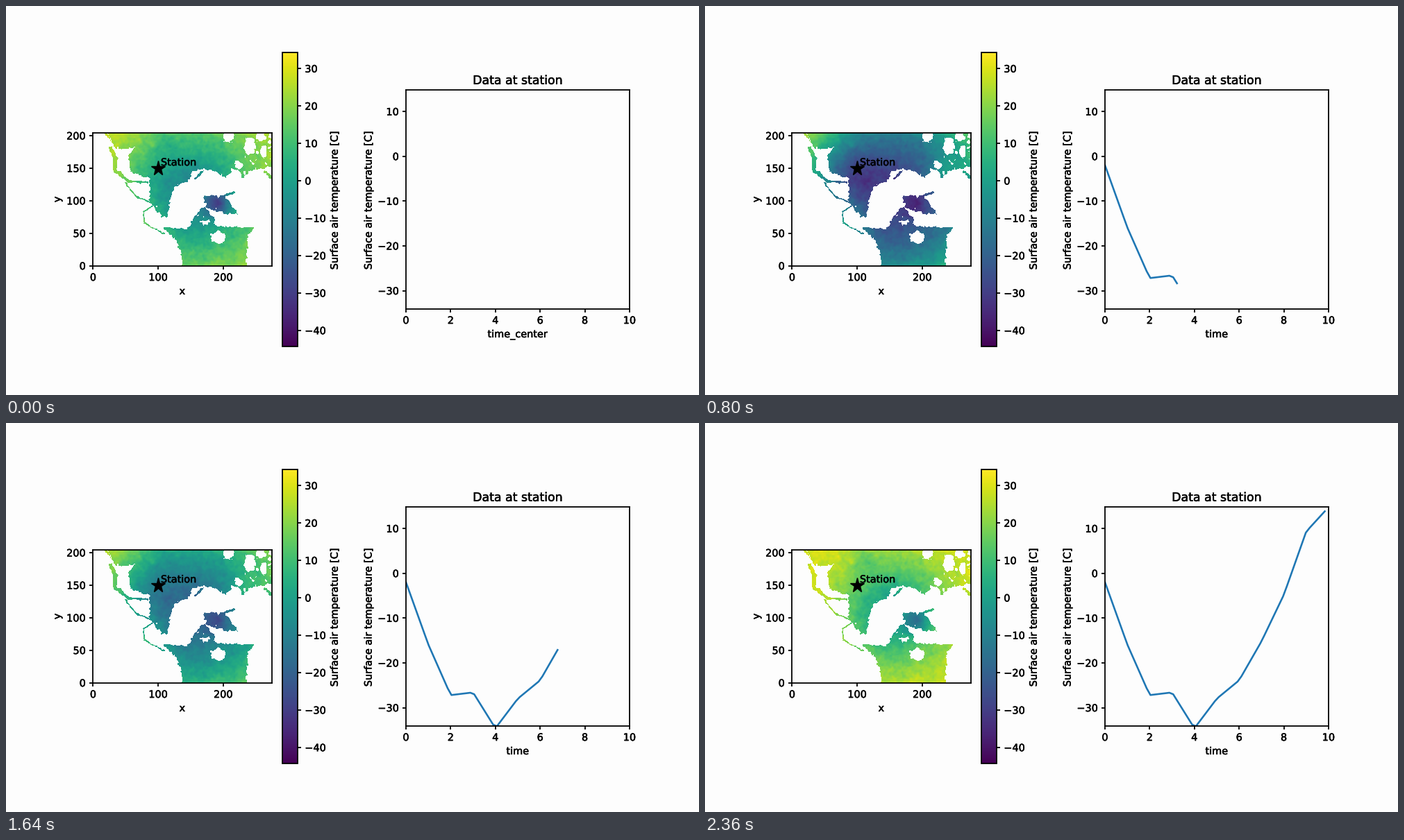
Write a matplotlib script that moves like this. It is 998 px wide and 561 px high and loops after 2.4 s.

```python
import numpy as np
import matplotlib.pyplot as plt
from matplotlib.animation import FuncAnimation
from matplotlib.path import Path
from matplotlib.patheffects import withStroke
from matplotlib.text import Text

W, H, DPI = 998, 561, 104
FRAMES, INTERVAL = 60, 40
NX, NY = 275, 205
X0, Y0, CELL = 125.3, 374.5, 0.9371  # stage position of grid cell (0, 0)
POLE = (272, 275)
PAPER = "#fdfdfd"
LABEL = "Surface air temperature [C]"

plt.rcParams.update({
    "font.family": "DejaVu Sans", "font.size": 10, "axes.linewidth": 1.25,
    "xtick.major.width": 1.25, "ytick.major.width": 1.25,
    "axes.facecolor": PAPER, "figure.facecolor": PAPER,
})
rng = np.random.default_rng(11)

# Key points of the coasts, in stage pixels
EURASIA = [
    (146, 180), (153, 200), (163, 208), (185, 204), (176, 217), (179, 240),
    (207, 250), (207, 280), (224, 306), (233, 304), (235, 280), (243, 262),
    (262, 252), (270, 237), (293, 235), (304, 241), (318, 250), (323, 237),
    (335, 237), (340, 249), (352, 238), (386, 232), (386, 180)]
AMERICA = [
    (224, 320), (262, 321), (274, 300), (285, 289), (297, 304), (302, 317),
    (355, 321), (348, 335), (346, 380), (256, 380), (251, 352), (241, 333)]
GREENLAND = [
    (286, 275), (314, 274), (323, 284), (334, 301), (318, 299), (288, 292)]
SEAS = [(320, 189, 8, 8), (350, 203, 8, 13), (367, 190, 8, 6),
        (371, 210, 5, 9), (335, 230, 5, 5), (305, 334, 11, 8),
        (287, 312, 6, 3)]
CHAINS = [
    ([(143, 184), (149, 192)], 1.6),
    ([(151, 206), (157, 222), (157, 238), (163, 244)], 2.6),
    ([(164, 242), (175, 253), (203, 255)], 2.0),
    ([(172, 256), (188, 276), (209, 284)], 1.0),
    ([(212, 288), (199, 296), (199, 313), (228, 329)], 0.9),
    ([(273, 249), (283, 239)], 1.5),
    ([(312, 276), (328, 269)], 2.0),
    ([(372, 240), (381, 248)], 2.0),
]
# Station temperature at each whole time step
STATION = [-2, -15.9, -27.2, -26.6, -34.6, -28, -23.9, -15.2, -4.8, 9.3, 14.75]


def noise(passes):
    """Smooth random field with unit spread."""
    f = rng.standard_normal((NY, NX))
    for _ in range(passes):
        for axis in (0, 1):
            f = (np.roll(f, 1, axis) + f + np.roll(f, -1, axis)) / 3
    return f / f.std()


def inside(points, x, y):
    xy = np.column_stack([x.ravel(), y.ravel()])
    return Path(points).contains_points(xy).reshape(x.shape)


def near(points, x, y):
    """Distance from every cell to a polyline."""
    best = np.full(x.shape, 1e9)
    for (ax, ay), (bx, by) in zip(points, points[1:]):
        dx, dy = bx - ax, by - ay
        u = np.clip(((x - ax) * dx + (y - ay) * dy) / (dx * dx + dy * dy), 0, 1)
        best = np.minimum(best, np.hypot(x - ax - u * dx, y - ay - u * dy))
    return best


def build_land(x, y):
    dx, dy = noise(2), noise(2)
    jx, jy = x + dx, y + dy
    land = np.zeros(x.shape, bool)
    for shape in (EURASIA, AMERICA, GREENLAND):
        land |= inside(shape, jx, jy)
    for cx, cy, rx, ry in SEAS:
        land &= ((jx - cx) / rx) ** 2 + ((jy - cy) / ry) ** 2 > 1
    islands = (x > 266) & (x < 300) & (y > 294) & (y < 320)
    europe = (x > 340) & (y < 250)
    land &= ~((islands | europe) & (noise(3) > 1.4))
    for points, half in CHAINS:
        land |= near(points, x + 0.5 * dx, y + 0.5 * dy) < half
    return land


def bump(x, y, cx, cy, size):
    return np.exp(-((x - cx) ** 2 + (y - cy) ** 2) / (2 * size ** 2))


def build_fields(x, y):
    """Warmest and coldest state: colder toward the pole, plus regions."""
    r2 = (x - POLE[0]) ** 2 + (y - POLE[1]) ** 2
    ice = bump(x, y, 305, 285, 13)
    warm = 30 - 32 * np.exp(-r2 / 75 ** 2) - 18 * ice
    warm -= 7 * bump(x, y, 230, 201, 12)
    cold = -34 + 0.0024 * r2 - 3 * ice
    cold -= 12 * bump(x, y, 215, 240, 25)
    cold += 16 * bump(x, y, 205, 318, 22) + 14 * bump(x, y, 345, 240, 18)
    relief = 0.8 * noise(2) + noise(12)
    return warm + relief, cold + relief, ice


def pixel_axes(left, top, right, bottom):
    return fig.add_axes([left / W, 1 - bottom / H,
                         (right - left) / W, (bottom - top) / H])


px, py = np.meshgrid(X0 + CELL * np.arange(NX), Y0 - CELL * np.arange(NY))
land = build_land(px, py)
warm, cold, ice = build_fields(px, py)

times = np.linspace(0, 10, FRAMES)
station = np.interp(times, np.arange(11), STATION)


def temperature(i):
    winter = ((14.75 - station[i]) / 48.9) ** 1.3
    field = warm + (cold - warm) * winter
    field = field - 9 * ice * max(0, 1 - times[i] / 5)  # early cold on the ice
    return np.ma.array(field, mask=~land)


fig = plt.figure(figsize=(998.001 / DPI, 561.001 / DPI), dpi=DPI)
map_ax = pixel_axes(125, 182.7, 382.7, 375)
bar_ax = pixel_axes(398, 67.5, 420.2, 491)
plot_ax = pixel_axes(576, 121.4, 898, 437)

image = map_ax.imshow(temperature(0), origin="lower", aspect="auto",
                      interpolation="nearest", cmap="viridis",
                      vmin=-44.3, vmax=34.2)
map_ax.set(xlabel="x", ylabel="y", xticks=range(0, 201, 100),
           yticks=range(0, 201, 50))
map_ax.plot(100, 150, "*", color="black", ms=15)
map_ax.text(104, 154, "Station")

bar = fig.colorbar(image, cax=bar_ax, label=LABEL)
bar.set_ticks(range(-40, 31, 10))

line, = plot_ax.plot([], [], color="C0", lw=1.8)
plot_ax.set(xlim=(0, 10), ylim=(-34.1, 14.75), xticks=range(0, 11, 2),
            yticks=range(-30, 11, 10), title="Data at station", ylabel=LABEL)

for label in fig.findobj(Text):
    label.set_path_effects([withStroke(linewidth=0.35, foreground="black")])


def update(i):
    image.set_data(temperature(i))
    line.set_data(times[:i], station[:i])
    plot_ax.set_xlabel("time" if i else "time_center")
    return image, line


anim = FuncAnimation(fig, update, frames=FRAMES, interval=INTERVAL,
                     repeat=True, repeat_delay=0, blit=False)
plt.show()
```
